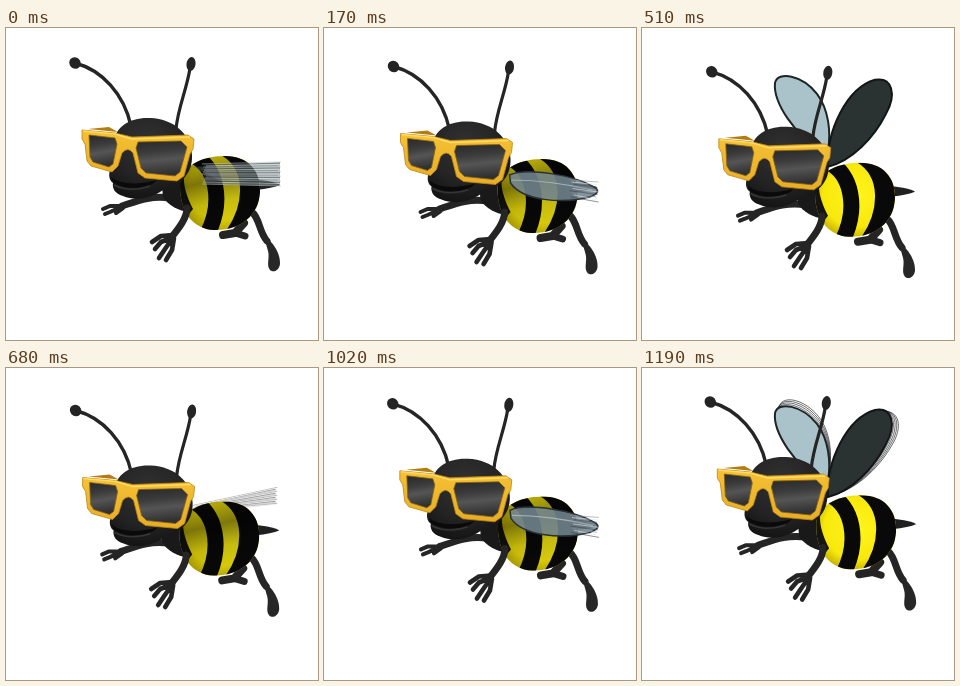
Animation, 312 px wide and 312 px high, one loop 1.36 s. Source, as an HTML page:

```html
<!DOCTYPE html>
<html lang="en">
<head>
<meta charset="utf-8">
<title>Flying bee</title>
<style>
  html, body { margin: 0; width: 100%; height: 100%; overflow: hidden; background: #fff; }
  svg { display: block; width: 100vw; height: 100vh; }
  .limb { fill: none; stroke: #252525; stroke-linecap: round; stroke-linejoin: round; }
</style>
</head>
<body>
<svg viewBox="0 0 312 312">
  <defs>
    <radialGradient id="skin" cx=".45" cy=".3" r=".75">
      <stop offset="0" stop-color="#323232"/><stop offset=".6" stop-color="#232323"/><stop offset="1" stop-color="#121212"/>
    </radialGradient>
    <radialGradient id="yellow" cx=".52" cy=".45" r=".6">
      <stop offset="0" stop-color="#fff51c"/><stop offset=".7" stop-color="#f8e80c"/><stop offset="1" stop-color="#bda900"/>
    </radialGradient>
    <linearGradient id="shade" x1="0" y1="0" x2=".25" y2="1">
      <stop offset="0" stop-color="#000" stop-opacity=".12"/><stop offset=".42" stop-color="#000" stop-opacity=".5"/>
      <stop offset=".68" stop-color="#000" stop-opacity=".22"/><stop offset="1" stop-color="#000" stop-opacity=".1"/>
    </linearGradient>
    <linearGradient id="lens" x1="0" y1="0" x2=".15" y2="1">
      <stop offset="0" stop-color="#292929"/><stop offset=".35" stop-color="#3b3b3b"/>
      <stop offset=".6" stop-color="#555"/><stop offset="1" stop-color="#303030"/>
    </linearGradient>
    <linearGradient id="frame" x1="0" y1="0" x2="0" y2="1">
      <stop offset="0" stop-color="#f5c135"/><stop offset="1" stop-color="#e6ad25"/>
    </linearGradient>
    <clipPath id="belly"><path id="bellyShape" d="M174 158C174 140 193 128 219 128C242 128 255 143 254 164C253 188 233 203 208 202C187 201 174 184 174 158Z"/></clipPath>
    <path id="farWing" d="M181 114C153 100 131 65 133 46C136 34 160 38 175 57C187 73 189 96 186 113Z"/>
    <path id="nearWing" d="M186 130C184 94 205 51 233 43C250 40 255 57 244 77C232 101 210 124 186 130Z"/>
  </defs>

  <g id="up">
    <g id="trail" fill="none" stroke="#333" stroke-width=".7"></g>
    <use href="#farWing" fill="#aac3cb" stroke="#1d2424" stroke-width="2"/>
    <use href="#nearWing" fill="#2b3232" stroke="#121616" stroke-width="2"/>
  </g>
  <g id="high"></g>

  <g id="body">
    <path d="M248 151L262 153Q272 155 274 157Q267 160 250 162Z" fill="#202020"/>
    <path class="limb" d="M238 195L229 205L217 207" stroke-width="8"/>
    <path class="limb" d="M229 205L239 208" stroke-width="7"/>
    <path class="limb" d="M246 184C254 191 253 204 261 213" stroke-width="7"/>
    <path d="M258 209C265 211 275 225 274 236C273 243 267 245 264 242C260 237 264 230 262 223Z" fill="#272727"/>
    <path class="limb" d="M164 170C145 167 131 173 116 178" stroke-width="7"/>
    <path class="limb" d="M118 178L104 178L97 181M115 179L104 184L99 186M117 180L110 185" stroke-width="4"/>
    <path d="M155 148C172 134 190 137 191 151L187 183C178 186 162 178 157 169Z" fill="#191919"/>
    <use href="#bellyShape" fill="url(#yellow)"/>
    <g clip-path="url(#belly)">
      <path d="M170 126L181 137C174 151 180 167 187 181L174 197Z" fill="#151515"/>
      <g fill="none" stroke="#090909">
        <path d="M186 127C211 138 218 174 201 207" stroke-width="16"/>
        <path d="M221 119C251 137 250 178 228 209" stroke-width="20"/>
      </g>
      <path id="dim" d="M170 124H258V207H170Z" fill="url(#shade)"/>
    </g>
  </g>

  <g id="streaks"></g>
  <g id="fold">
    <path d="M186 142C202 134 252 142 272 155C276 158 274 161 266 164C239 171 199 168 187 150Z" fill="#74868f" fill-opacity=".88" stroke="#293137" stroke-width="1.5"/>
    <path d="M188 147Q225 147 269 157" fill="none" stroke="#a4b3b9" stroke-width="1.2"/>
  </g>

  <g id="arm">
    <path class="limb" d="M181 180C181 190 173 200 165 210" stroke-width="7"/>
    <path class="limb" d="M167 207L155 208L146 214M165 210L155 214L149 221M166 211L159 221L153 230M168 210L166 222L160 232" stroke-width="4.6"/>
  </g>

  <g id="head">
    <path class="limb" d="M69 35C96 42 118 66 125 98" stroke-width="3.4"/>
    <path class="limb" d="M184 40C181 61 172 79 170 101" stroke-width="3.2"/>
    <ellipse cx="69" cy="35" rx="6" ry="5.5" transform="rotate(45 69 35)" fill="#242424"/>
    <ellipse cx="185" cy="36" rx="4.5" ry="7" transform="rotate(8 185 36)" fill="#242424"/>
    <path d="M108 115C109 98 125 89 144 90C169 91 185 107 186 127C187 146 174 157 157 162C145 171 129 173 117 168C109 166 106 160 107 155C101 151 103 141 107 136Z" fill="url(#skin)"/>
    <path d="M105 149C115 157 132 157 151 152C143 162 117 162 107 154Z" fill="#0a0a0a"/>
    <path d="M108 157Q124 165 144 158" fill="none" stroke="#343434" stroke-width="1.6"/>
    <path d="M82 101L103 99L112 104Z" fill="#b47d12"/>
    <path d="M76 102L109 105L126 109L182 107L188 111L187 121L184 126L178 148L171 153L139 150L132 145L127 125Q122 118 116 125L112 138L106 144L85 138L81 133L79 116L76 111Z" fill="url(#frame)" stroke="#bd8417" stroke-width=".8" stroke-linejoin="round"/>
    <path d="M77 103L109 106L126 111L184 109" fill="none" stroke="#ffdb62" stroke-width="1.4"/>
    <path d="M83 107L109 110L111 116L107 136L103 139L87 134L84 129Z" fill="url(#lens)" stroke="#886219" stroke-width=".8"/>
    <path d="M132 114L175 113L181 119L174 144L169 148L140 145L135 140L130 120Z" fill="url(#lens)" stroke="#886219" stroke-width=".8"/>
  </g>
</svg>
<script>
const STEP = 170;
const $ = id => document.getElementById(id);

// Vertical and sideways drift of each part, one row per pose.
const poses = [
  // head x, head y, body y, arm y, wing
  [0, 0, 0, 0, 'streaks'],
  [.5, 3.5, 3, 4, 'fold'],
  [.8, 7, 5.2, 6.5, 'streaks'],
  [.8, 8.8, 6.7, 8, 'up'],
  [.6, 7.5, 5.4, 7, 'high'],
  [0, 4, 3, 4, 'fold'],
  [-.2, .8, .4, .5, 'fold'],
  [-.7, -1, -.8, -.5, 'up']
];

function add(group, tag, attrs) {
  const el = document.createElementNS('http://www.w3.org/2000/svg', tag);
  for (const key in attrs) el.setAttribute(key, attrs[key]);
  group.append(el);
}

// Fans of thin lines give the blurred wings.
function fan(group, count, from, to, tones) {
  for (let i = 0; i < count; i++) {
    const k = i / (count - 1);
    const x1 = from[0] + (i * 7 % 5), y1 = from[1] + from[2] * k;
    const x2 = to[0] - (i * 5 % 4), y2 = to[1] + to[2] * k;
    add(group, 'path', {
      d: `M${x1} ${y1}L${x2} ${y2}`, fill: 'none',
      stroke: tones[i % tones.length], 'stroke-width': .9
    });
  }
}

add($('streaks'), 'path', { d: 'M187 139L274 134V158L222 157Z', fill: '#59646a', 'fill-opacity': .4 });
fan($('streaks'), 21, [196, 136, 20], [275, 134, 24], ['#b8bfc2aa', '#4a555baa', '#dde1e2aa', '#7e888caa']);
add($('high'), 'path', { d: 'M186 135L271 114V131L205 138Z', fill: '#d9d9d9', 'fill-opacity': .8 });
fan($('high'), 18, [188, 132, 6], [272, 114, 17], ['#b5b5b5', '#f2f2f2', '#929292', '#d5d5d5']);
fan($('fold'), 9, [246, 147, 17], [275, 149, 20], ['#8a9498aa', '#e1e5e6aa', '#3e484daa']);

for (let i = 1; i < 5; i++) {
  add($('trail'), 'use', { href: '#farWing', transform: `rotate(${i * .9} 184 113) translate(0 ${-i})` });
  add($('trail'), 'use', { href: '#nearWing', transform: `rotate(${i * .9} 187 130) translate(${i * .5} ${-i * .4})` });
}

const move = (id, x, y) => $(id).setAttribute('transform', `translate(${x} ${y})`);
const show = (id, on) => $(id).style.display = on ? '' : 'none';

function draw(time) {
  const n = Math.floor(time / STEP) % poses.length;
  const [hx, hy, by, ay, wing] = poses[n];
  const bx = -by * .15;
  move('head', hx, hy);
  move('arm', bx, ay);
  for (const id of ['body', 'streaks', 'high']) move(id, bx, by);
  move('fold', bx, by + (n === 6 ? 0 : 2));
  move('up', 0, wing === 'up' ? hy : 0);
  for (const id of ['streaks', 'high', 'fold', 'up']) show(id, id === wing);
  show('trail', n === 7);
  show('dim', wing !== 'up');
}

let start;
function tick(now) {
  start ??= now;
  draw(now - start);
  requestAnimationFrame(tick);
}
draw(0);
requestAnimationFrame(tick);
</script>
</body>
</html>
```
